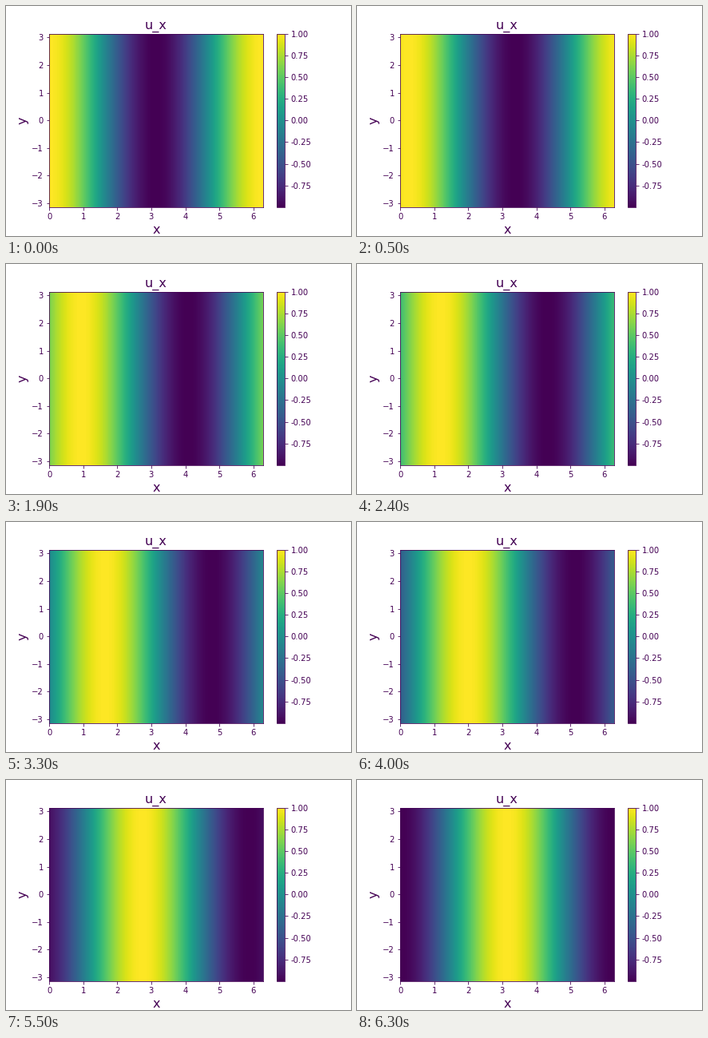
Animation of 432 by 288 pixels, one loop 6400 ms. Source, as a matplotlib script:

```python
import numpy as np
import matplotlib.pyplot as plt
from matplotlib.animation import FuncAnimation

FRAMES = 64
INTERVAL = 100
STEP = 0.05          # phase advance per frame
INK = "#440154"

plt.rcParams.update({
    "font.family": "DejaVu Sans",
    "font.size": 10,
    "text.color": INK,
    "axes.edgecolor": INK,
    "axes.labelcolor": INK,
    "xtick.color": INK,
    "ytick.color": INK,
})

# Cell centres across one full period
COLS = 536
x = (np.arange(COLS) + 0.5) * 2 * np.pi / COLS


def wave(frame):
    """Travelling cosine, constant along y."""
    return np.cos(x - STEP * frame)[np.newaxis, :]


fig = plt.figure(figsize=(6, 4), dpi=72, facecolor="white")
fig.subplots_adjust(left=0.125, right=0.9, bottom=0.125, top=0.88)
ax = fig.add_subplot()

field = ax.imshow(wave(0), cmap="viridis", vmin=-0.9995, vmax=1,
                  extent=(0, 2 * np.pi, -np.pi, np.pi),
                  aspect="auto", interpolation="nearest")
ax.set_xticks(range(7))
ax.set_yticks(range(-3, 4))
ax.set_title("u_x", fontsize=16)
ax.set_xlabel("x", fontsize=16)
ax.set_ylabel("y", fontsize=16)

fig.colorbar(field, ax=ax, ticks=np.arange(-0.75, 1.01, 0.25), format="%.2f")


def update(frame):
    field.set_data(wave(frame))
    return [field]


anim = FuncAnimation(fig, update, frames=FRAMES, interval=INTERVAL,
                     repeat=True, repeat_delay=0, blit=False)

plt.show()
```
